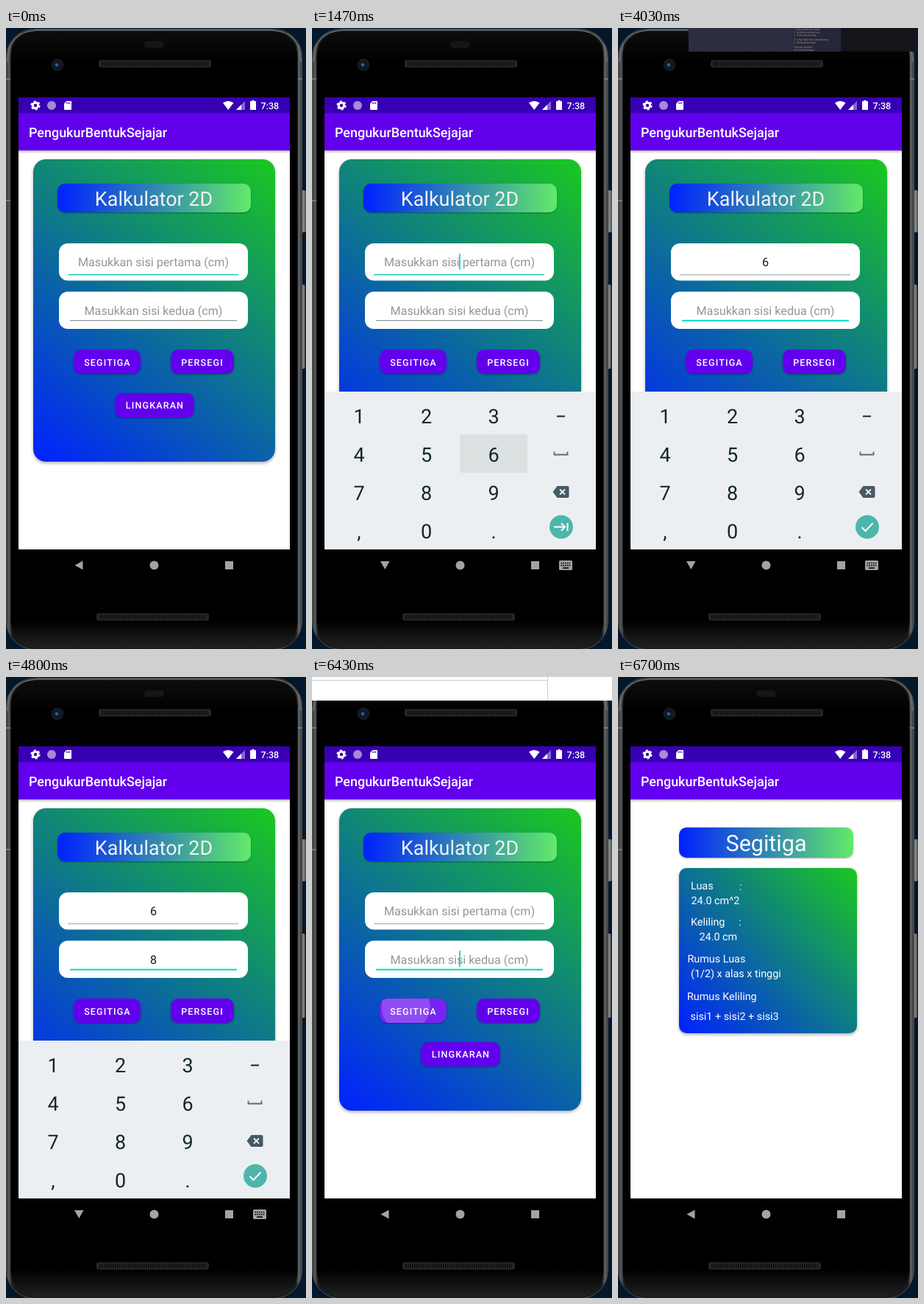
An HTML page for the animation above (9630 ms loop, 408 by 842 pixels).

```html
<!DOCTYPE html>
<html lang="id">
<head>
<meta charset="utf-8">
<title>Kalkulator 2D</title>
<style>
html, body { margin: 0; width: 100%; height: 100%; overflow: hidden; background: #04172b; }
svg { display: block; width: 408px; height: 842px; }
text { font-family: Roboto, sans-serif; text-rendering: geometricPrecision; }
.mid { text-anchor: middle; }
.card, .pill { position: absolute; box-sizing: border-box; }
.card { box-shadow: 0 2px 4px rgba(0,0,0,.32); }
.pill { background: linear-gradient(90deg, #0021ff, #62ea68); border-radius: 10px; box-shadow: 0 1px 2px rgba(0,0,0,.35); }
.hint { font-size: 16.16px; fill: #959595; }
.value { font-size: 16.16px; fill: #1c1c1c; }
.label { font-size: 12.57px; font-weight: 500; letter-spacing: .0892em; fill: #fff; }
.info { font-size: 14.36px; fill: #fff; }
.digits { font-size: 27px; fill: #12262f; }
.btn { fill: #6200ee; filter: drop-shadow(0 1.5px 1.2px rgba(0,0,0,.35)); }

/* One 9.63 s loop; 1% = 96.3 ms */
.anim { animation: 9.63s step-end infinite; }
.empty1 { animation-name: empty1; }
.filled1 { animation-name: filled1; }
.empty2 { animation-name: empty2; }
.filled2 { animation-name: filled2; }
.caret1 { animation-name: caret1; }
.caret2 { animation-name: caret2; }
.line1 { animation-name: line1; }
.line2 { animation-name: line2; }
.six { animation-name: six; }
.eight { animation-name: eight; }
.next { animation-name: next; }
.done { animation-name: done; }
.closed { animation-name: closed; }
.opened { animation-name: opened; }
.editor { animation-name: editor; }
.sheet { animation-name: tap; }
.keys { animation: keys 9.63s linear infinite; }
.result { animation: result 9.63s linear infinite; }

@keyframes empty1 { 0% { opacity: 1 } 15.88% { opacity: 0 } 66.77%, 100% { opacity: 1 } }
@keyframes filled1 { 0% { opacity: 0 } 15.88% { opacity: 1 } 66.77%, 100% { opacity: 0 } }
@keyframes empty2 { 0% { opacity: 1 } 44.65% { opacity: 0 } 66.77%, 100% { opacity: 1 } }
@keyframes filled2 { 0% { opacity: 0 } 44.65% { opacity: 1 } 66.77%, 100% { opacity: 0 } }
@keyframes caret1 {
  0% { opacity: 0; transform: none }
  2.8% { opacity: 1; transform: none }
  15.88% { opacity: 1; transform: translateX(4px) }
  20.76%, 100% { opacity: 0; transform: none }
}
@keyframes caret2 {
  0% { opacity: 0; transform: none }
  26.68% { opacity: 1; transform: none }
  31.87% { opacity: 0; transform: none }
  37.07% { opacity: 1; transform: none }
  41.84% { opacity: 0; transform: none }
  44.65% { opacity: 1; transform: translateX(4px) }
  49.84% { opacity: 0; transform: none }
  55.03% { opacity: 1; transform: translateX(4px) }
  60.22% { opacity: 0; transform: none }
  66.77%, 100% { opacity: 1; transform: none }
}
@keyframes line1 { 0% { stroke: #18c9b8 } 26.68%, 100% { stroke: #b9b9b9 } }
@keyframes line2 {
  0% { stroke: #7c7c7c; stroke-width: 1px }
  26.68%, 100% { stroke: #03dac5; stroke-width: 2px }
}
@keyframes six { 0% { opacity: 0 } 15.26% { opacity: 1 } 15.88%, 100% { opacity: 0 } }
@keyframes eight { 0% { opacity: 0 } 43.3% { opacity: 1 } 44.65%, 100% { opacity: 0 } }
@keyframes next { 0% { opacity: 1 } 26.68%, 100% { opacity: 0 } }
@keyframes done { 0% { opacity: 0 } 26.68%, 100% { opacity: 1 } }
@keyframes closed { 0% { opacity: 1 } 2.8% { opacity: 0 } 53.27%, 100% { opacity: 1 } }
@keyframes opened { 0% { opacity: 0 } 2.8% { opacity: 1 } 53.27%, 100% { opacity: 0 } }
@keyframes editor { 0% { opacity: 0 } 41.84% { opacity: 1 } 42.26%, 100% { opacity: 0 } }
@keyframes tap { 0% { opacity: 0 } 66.77% { opacity: 1 } 67.49%, 100% { opacity: 0 } }
.ripple { animation-name: ripple; }
@keyframes ripple { 0% { opacity: 0 } 66.77% { opacity: 1 } 69.57%, 100% { opacity: 0 } }
@keyframes keys {
  0% { opacity: 0; transform: translateY(54px) }
  2.8% { opacity: 0; transform: translateY(54px); animation-timing-function: cubic-bezier(.1,.8,.3,1) }
  5.5% { opacity: 1; transform: none }
  53.27% { opacity: 1; transform: none; animation-timing-function: cubic-bezier(.5,0,.9,.6) }
  55.03%, 55.34% { opacity: .6; transform: translateY(20.5px) }
  55.76%, 100% { opacity: 0; transform: translateY(54px) }
}
@keyframes result {
  0% { opacity: 0; transform: translateY(24px) }
  67.49% { opacity: 0; transform: translateY(24px); animation-timing-function: cubic-bezier(.2,.6,.3,1) }
  69.57%, 100% { opacity: 1; transform: none }
}
</style>
</head>
<body>
<svg viewBox="0 0 408 842">
  <defs>
    <linearGradient id="rim" x1="0" x2="1" y1="0" y2="0">
      <stop offset="0" stop-color="#2c2d2e"/><stop offset=".008" stop-color="#5a5b5c"/>
      <stop offset=".02" stop-color="#191a1a"/><stop offset=".98" stop-color="#191a1a"/>
      <stop offset=".99" stop-color="#626364"/><stop offset="1" stop-color="#333"/>
    </linearGradient>
    <linearGradient id="glass" x1="0" x2="0" y1="0" y2="1">
      <stop offset="0" stop-color="#0d0d0e"/><stop offset=".05" stop-color="#000"/>
      <stop offset=".955" stop-color="#000"/><stop offset="1" stop-color="#202122"/>
    </linearGradient>
    <linearGradient id="side" x1="0" x2="1" y1="0" y2="0">
      <stop offset="0" stop-color="#333"/><stop offset=".5" stop-color="#8b8c8d"/><stop offset="1" stop-color="#4a4b4c"/>
    </linearGradient>
    <linearGradient id="shade" x1="0" x2="0" y1="0" y2="1">
      <stop offset="0" stop-opacity=".28"/><stop offset="1" stop-opacity="0"/>
    </linearGradient>
    <clipPath id="segitiga"><rect x="92" y="436" width="91" height="33" rx="10.5"/></clipPath>
    <g id="bar">
      <rect x="17" y="94" width="369" height="613" fill="#fff"/>
      <rect x="17" y="166" width="369" height="4" fill="url(#shade)"/>
      <rect x="17" y="115" width="369" height="51" fill="#6200ee"/>
      <rect x="17" y="94" width="369" height="21.5" fill="#3700b3"/>
      <text x="31" y="148" font-size="17.96" font-weight="500" fill="#fff">PengukurBentukSejajar</text>
    </g>
    <g id="slot">
      <rect width="153" height="10" rx="3" fill="#252627"/>
      <path d="M4 5H149" stroke="#0a0a0a" stroke-width="6" stroke-dasharray="1.4 1.6"/>
    </g>
  </defs>

  <!-- Phone -->
  <rect width="408" height="842" fill="#04172b"/>
  <rect x="401" y="220" width="7" height="57" rx="2" fill="url(#side)"/>
  <rect x="401" y="348" width="6" height="114" rx="2" fill="url(#side)"/>
  <rect x=".5" y="1.5" width="402" height="841" rx="38" fill="url(#rim)" stroke="#4f5051"/>
  <path d="M2 46Q3 4 42 3H361Q400 4 401 46" fill="none" stroke="#707172" stroke-width="1.5"/>
  <path d="M0 69H6M0 234H6M397 69H403" stroke="#777" stroke-width="2"/>
  <rect x="6.5" y="4.5" width="390" height="836" rx="34" fill="url(#glass)"/>
  <rect x="188" y="18" width="27" height="9" rx="4.5" fill="#15161a"/>
  <circle cx="70" cy="50" r="8.5" fill="#17191d"/>
  <circle cx="70" cy="50" r="5.5" fill="#0a1a2d"/>
  <circle cx="69" cy="50" r="2.3" fill="#315f94"/>
  <use href="#slot" x="126" y="43.5"/>
  <use href="#slot" x="123" y="793.5"/>
  <rect x="17" y="707" width="369" height="43" fill="#000"/>

  <!-- Input page -->
  <use href="#bar"/>
  <foreignObject x="17" y="167" width="369" height="440">
    <div class="card" style="margin:11px 0 0 20px;width:328.5px;height:410px;border-radius:17px;background:linear-gradient(38.7deg,#0021ff,#1bc81f)"></div>
    <div class="pill" style="margin:44px 0 0 53px;width:263px;height:39px"></div>
  </foreignObject>
  <text class="mid" x="201" y="241" font-size="26.93" fill="#f2f2f2">Kalkulator 2D</text>
  <rect x="72" y="292" width="257" height="50.5" rx="12" fill="#fff"/>
  <rect x="72" y="357.500" width="257" height="50.500" rx="12" fill="#fff"/>
  <path class="anim line1" d="M84 334.500H316" stroke-width="1.6"/>
  <path class="anim line2" d="M87 396.700H314"/>
  <text class="anim empty1 hint mid" x="200.5" y="323">Masukkan sisi pertama (cm)</text>
  <text class="anim filled1 value mid" x="200.5" y="323">6</text>
  <text class="anim empty2 hint mid" x="200.5" y="388.500">Masukkan sisi kedua (cm)</text>
  <text class="anim filled2 value mid" x="200.5" y="388.500">8</text>
  <rect class="anim caret1" x="200" y="306" width="1.8" height="21.500" fill="#03dac5"/>
  <rect class="anim caret2" x="200" y="371" width="1.8" height="22" fill="#03dac5"/>
  <rect class="btn" x="92" y="436" width="91" height="33" rx="10.500"/>
  <rect class="btn" x="224" y="436" width="86" height="33" rx="10.500"/>
  <rect class="btn" x="148" y="495" width="108" height="33" rx="10.500"/>
  <g class="anim ripple" clip-path="url(#segitiga)" fill="#fff">
    <rect x="92" y="436" width="91" height="33" fill-opacity=".14"/>
    <circle cx="127.500" cy="447" r="33" fill-opacity=".18"/>
  </g>
  <g class="label mid">
    <text x="138" y="458">SEGITIGA</text>
    <text x="267" y="458">PERSEGI</text>
    <text x="202.500" y="516">LINGKARAN</text>
  </g>

  <!-- Keyboard -->
  <g class="keys">
    <rect x="17" y="493" width="369" height="214" fill="#eceff1"/>
    <rect class="anim six" x="201" y="551" width="92" height="52" fill="#dbe0e1"/>
    <rect class="anim eight" x="109" y="603" width="92" height="52" fill="#dbe0e1"/>
    <g class="digits mid">
      <text x="64 155.500 247" y="535.500">123</text>
      <text x="64 155.500 247" y="587.500">456</text>
      <text x="64 155.500 247" y="639.500">789</text>
      <text x="64 155.500 247" y="691.500">,0.</text>
    </g>
    <path d="M333 526.500H344" stroke="#12262f" stroke-width="2"/>
    <path d="M329.500 574.500V578.500H347.500V574.500" fill="none" stroke="#5c6b73" stroke-width="1.8"/>
    <path d="M327.500 629 333.500 621H347.500Q349.500 621 349.500 623V635Q349.500 637 347.500 637H333.500Z" fill="#455a64"/>
    <path d="M337 625.500 344 632.500M344 625.500 337 632.500" stroke="#eceff1" stroke-width="1.8"/>
    <circle cx="339" cy="676.500" r="16" fill="#4db6ac"/>
    <g fill="none" stroke="#fff" stroke-width="2">
      <path class="anim next" d="M329 676.500H344M339 671.500 344 676.500 339 681.500M347.500 671V682"/>
      <path class="anim done" d="M331.500 677 336.500 682 346.500 671.500"/>
    </g>
  </g>

  <!-- Result page -->
  <g class="result">
    <use href="#bar"/>
    <foreignObject x="17" y="190" width="369" height="310">
      <div class="pill" style="margin:14px 0 0 66px;width:237px;height:41px"></div>
      <div class="card" style="margin:69px 0 0 66px;width:242px;height:224px;border-radius:10px;background:linear-gradient(47.2deg,#0021ff,#1bc81f)"></div>
    </foreignObject>
    <text class="mid" x="201.500" y="236" font-size="30.5" fill="#fff">Segitiga</text>
    <g class="info">
      <text x="99" y="288">Luas</text><text x="165" y="289">:</text>
      <text x="99.500" y="308">24.0 cm^2</text>
      <text x="99" y="336.500">Keliling</text><text x="164" y="336.500">:</text>
      <text x="110.500" y="356.500">24.0 cm</text>
      <text x="94.500" y="386.500">Rumus Luas</text>
      <text x="99" y="406.500">(1/2) x alas x tinggi</text>
      <text x="94" y="437.500">Rumus Keliling</text>
      <text x="98.500" y="464.500">sisi1 + sisi2 + sisi3</text>
    </g>
  </g>

  <!-- Status icons -->
  <g fill="#fff">
    <circle cx="40" cy="105" r="3.700" fill="none" stroke="#fff" stroke-width="3"/>
    <circle cx="40" cy="105" r="5.600" fill="none" stroke="#fff" stroke-width="2" stroke-dasharray="2.930 2.930"/>
    <circle cx="62" cy="105" r="6" fill="#a58bd8"/>
    <path d="M82.500 99H88Q89 99 89 100V110Q89 111 88 111H80Q79 111 79 110V102.500Z"/>
    <path d="M82.700 100.500V103M84.700 100.500V103M86.700 100.500V103" stroke="#3700b3"/>
    <path d="M295 101.500Q302 96.500 309.500 101.500L302.200 111Z"/>
    <path d="M313 111 325 99V111Z" opacity=".4"/>
    <path d="M313 111 320 104V111Z"/>
    <path d="M334.500 98H337.500V99.300H340V111H332V99.300H334.500Z"/>
    <text x="346.500" y="110" font-size="12.57" font-weight="500">7:38</text>
  </g>

  <!-- Navigation icons -->
  <g fill="#a3a3a3">
    <path class="anim closed" d="M93.500 728.500 104.500 722.500V734.500Z"/>
    <circle cx="201.500" cy="728.500" r="6"/>
    <rect x="298" y="723" width="11" height="11"/>
    <g class="anim opened">
      <path d="M93 723H105.500L99.300 734Z"/>
      <rect x="336" y="722" width="18" height="13" rx="1.500"/>
      <path d="M338.500 725.500H352M338.500 728.700H352" stroke="#000" stroke-width="1.700" stroke-dasharray="1.700 1.100"/>
      <path d="M341 732.200H349" stroke="#000" stroke-width="1.600"/>
    </g>
  </g>

  <!-- Windows passing over the top edge -->
  <g class="anim editor">
    <rect x="96" width="312" height="32" fill="#2b2d40"/>
    <rect x="238" width="65" height="32" fill="#25273a"/>
    <rect x="303" width="105" height="32" fill="#14151b"/>
    <g font-size="3.6" fill="#a0917a">
      <text x="239" y="3">1. Buka halaman awal</text>
      <text x="239" y="7">2. Isi kedua kolom sisi</text>
      <text x="239" y="11">3. Pilih satu bentuk</text>
      <text x="239" y="17">4. Lihat hasil luas dan keliling</text>
      <text x="239" y="21">5. Kembali ke awal</text>
      <text x="239" y="27">Catatan singkat</text>
      <text x="239" y="31">## Hasil hitungan</text>
    </g>
  </g>
  <g class="anim sheet">
    <rect width="408" height="32" fill="#fff"/>
    <path d="M0 4.500H320.500M320.500 0V32" fill="none" stroke="#c3d0da"/>
  </g>
</svg>
</body>
</html>
```
